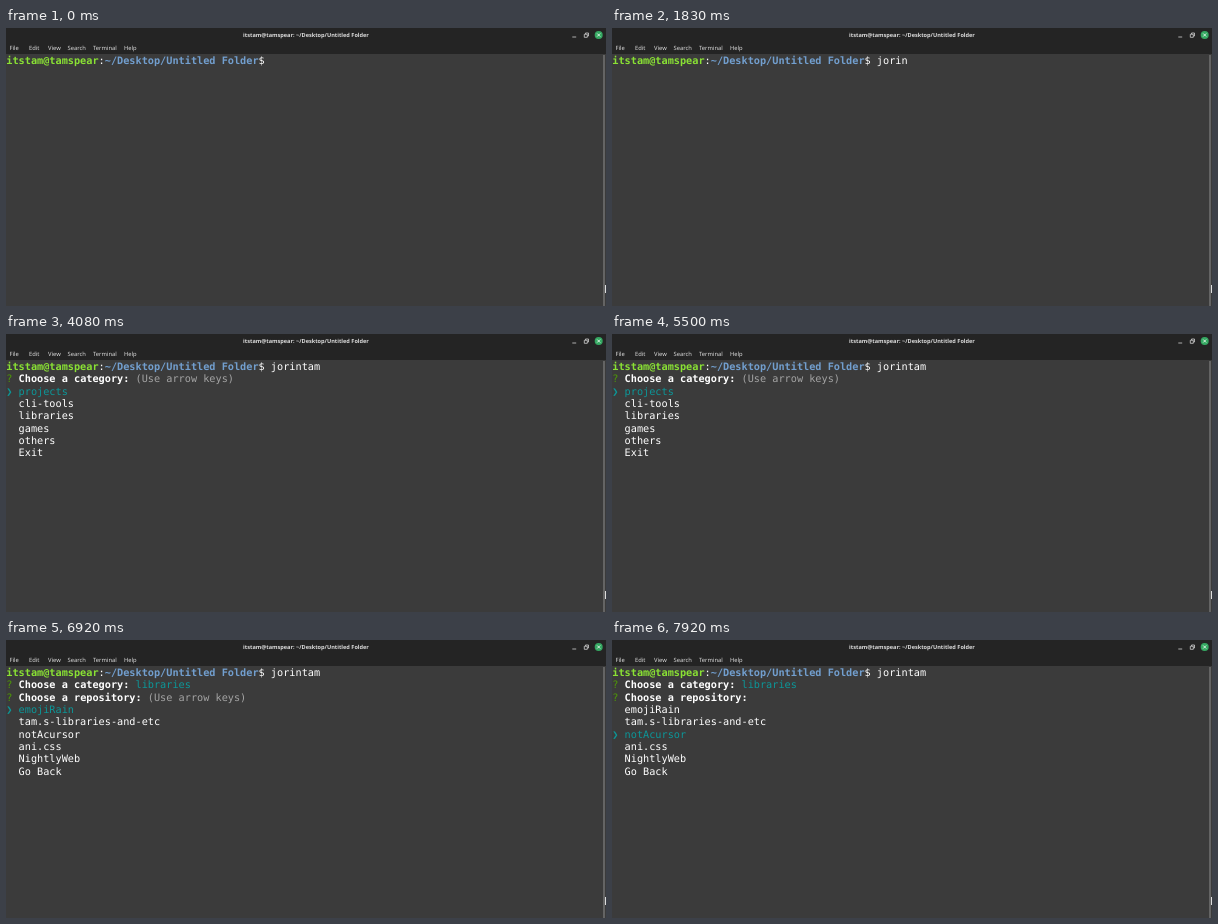
These frames come from a looping animation (600x278 px, 8 s). An HTML page:

```html
<!DOCTYPE html>
<html lang="en">
<head>
<meta charset="utf-8">
<title>Terminal</title>
<style>
html, body { margin: 0; width: 100%; height: 100%; overflow: hidden; background: #3b3b3b; }
body { position: relative; text-rendering: geometricPrecision; }
#bar { position: absolute; left: 0; top: 0; width: 600px; height: 25.5px; background: #242424; }
#bar svg { position: absolute; left: 0; top: 0; }
#bar text { font: 5.8px "Noto Sans", "Open Sans", sans-serif; fill: #dcdcdc; }
#bar .title { font-size: 5.58px; font-weight: bold; text-anchor: middle; }
#scroll { position: absolute; left: 596.5px; top: 27px; width: 2.5px; height: 251px; background: #646464; }
#tip { position: absolute; left: 599px; top: 257px; width: 1px; height: 8px; background: #ddd; }
#term {
  position: absolute; left: .3px; top: 28.1px; margin: 0; color: #fff;
  font: 10.22px/12.33px "DejaVu Sans Mono", monospace;
}
#term div { height: 12.33px; }
#term b.user { color: #8ae234; }
#term b.path { color: #729fcf; }
.mark { color: #4e9a06; }
.pick { color: #0c9799; }
.hint { color: #a4a4a4; }
#cursor { position: absolute; width: 6.2px; height: 12.2px; background: #fff; }
</style>
</head>
<body>
<div id="bar">
  <svg width="600" height="26">
    <text class="title" x="300" y="9">itstam@tamspear: ~/Desktop/Untitled Folder</text>
    <text x="3.5" y="22">File</text>
    <text x="23" y="22">Edit</text>
    <text x="42" y="22">View</text>
    <text x="61.5" y="22">Search</text>
    <text x="87" y="22">Terminal</text>
    <text x="118" y="22">Help</text>
    <g fill="none" stroke="#d0d0d0" stroke-width=".8">
      <path d="M566.3 9H570.2M578.3 6.3h3v3h-3zM579.5 6V5h3v3h-1"/>
      <circle cx="592.7" cy="7" r="4" fill="#35a862" stroke="none"/>
      <path d="M591.2 5.5l3 3m0-3l-3 3" stroke="#fff"/>
    </g>
  </svg>
</div>
<div id="scroll"></div>
<div id="tip"></div>
<pre id="term"></pre>
<div id="cursor"></div>
<script>
const LOOP = 8000, BLINK = 575, CELL = 6.155, ROW = 12.33;
const command = "jorintam";
const keys = [580, 750, 920, 1080, 1250, 2330, 2500, 2670];
const enter = 3500, menu = 3750;
const category = {
  name: "category", downs: [5920, 6250], done: 6750,
  items: ["projects", "cli-tools", "libraries", "games", "others", "Exit"]
};
const repository = {
  name: "repository", downs: [7500, 7830], done: LOOP,
  items: ["emojiRain", "tam.s-libraries-and-etc", "notAcursor", "ani.css", "NightlyWeb", "Go Back"]
};
const term = document.getElementById("term");
const cursor = document.getElementById("cursor");
const span = (cls, text) => `<span class="${cls}">${text}</span>`;
const passed = (times, t) => times.filter(k => k <= t).length;

function prompt(list, t) {
  const index = passed(list.downs, t);
  const head = span("mark", "?") + ` <b>Choose a ${list.name}:</b> `;
  if (t >= list.done) return [head + span("pick", list.items[index])];
  return [
    head + (index ? "" : span("hint", "(Use arrow keys)")),
    ...list.items.map((item, i) => i === index ? span("pick", "❯ " + item) : "  " + item)
  ];
}

let shown = "";
function draw(t) {
  const typed = passed(keys, t);
  const rows = ['<b class="user">itstam@tamspear</b>:<b class="path">~/Desktop/Untitled Folder</b>$ '
    + command.slice(0, typed)];
  if (t >= menu) rows.push(...prompt(category, t));
  if (t >= category.done) rows.push(...prompt(repository, t));
  const html = rows.map(r => `<div>${r}</div>`).join("");
  if (html !== shown) term.innerHTML = shown = html;

  const waiting = t >= enter;
  const lit = waiting ? t < menu : typed > 0 && t - keys[typed - 1] < BLINK;
  cursor.style.display = lit ? "block" : "none";
  cursor.style.left = .3 + (waiting ? 0 : 43 + typed) * CELL + "px";
  cursor.style.top = 26.7 + (waiting ? ROW : 0) + "px";
}

function tick() {
  draw(performance.now() % LOOP);
  requestAnimationFrame(tick);
}
tick();
</script>
</body>
</html>
```
